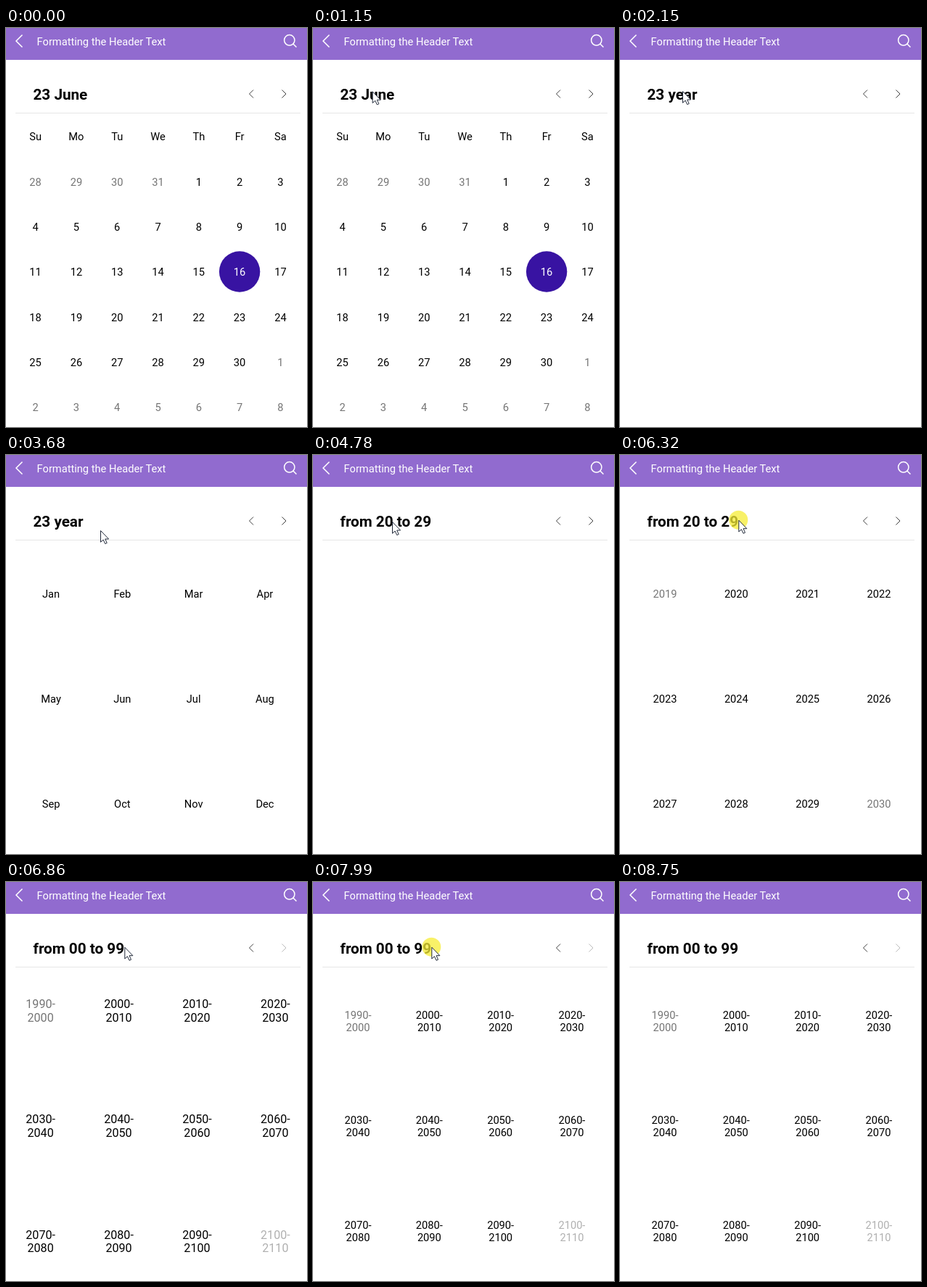
These frames come from a looping animation (415x551 px, 9020 ms). An HTML page:

```html
<!DOCTYPE html>
<html lang="en">
<head>
<meta charset="utf-8">
<title>Calendar header</title>
<style>
  html, body { margin: 0; width: 100%; height: 100%; overflow: hidden; background: #fff; }
  svg { display: block; width: 415px; height: 551px; font: 14.65px Roboto, sans-serif; fill: #000; }
  .line { fill: none; stroke: #3c3c3c; stroke-width: 1; }
  .bar { fill: none; stroke: #fff; stroke-width: 1.5; }
  .cells { text-anchor: middle; }
  .dim { fill: #757575; }
  .off { fill: #b0b0b0; }
  .picked { fill: #fff; }
</style>
</head>
<body>
<svg viewBox="0 0 415 551">
  <defs><clipPath id="body"><rect x="13" y="119" width="393" height="432"/></clipPath></defs>
  <rect width="415" height="44" fill="#916bcf"/>
  <g class="bar"><path d="M22.5 9.5L14 18l8.5 8.5"/><circle cx="390.8" cy="16.8" r="7.2"/><path d="M396 22l4.5 4.5"/></g>
  <text x="42.6" y="23.8" fill="#fff">Formatting the Header Text</text>
  <text id="header" x="37.5" y="99.3" font-size="20.7" font-weight="700"></text>
  <path class="line" d="M341 85.5L335.5 91l5.5 5.5"/>
  <path id="next" class="line" d="M380.5 85.5L386 91l-5.5 5.5"/>
  <path d="M13 117.5H406" stroke="#e6e6e6"/>
  <g id="views" class="cells" clip-path="url(#body)"></g>
  <circle id="tap" r="13" fill="#f6ec35" opacity=".75"/>
  <path id="cursor" d="M.5 .5V16.3L4.1 13 6.7 18.6 9.2 17.5 6.7 12H11.6Z" fill="#fff" stroke="#222a3a"/>
</svg>
<script>
const LOOP = 9020, STEP = 67.5, CX = 209.5, CY = 337;
const TAP_HOLD = 140, FADE = 70, GROW = 3 * STEP;
const $ = id => document.getElementById(id);
const label = (x, y, s, cls = '') => `<text x="${x}" y="${y + 5.2}" class="${cls}">${s}</text>`;
const stepped = t => Math.floor(Math.max(0, t) / STEP + 1e-6) * STEP;
const easeOut = (p, power) => 1 - (1 - Math.min(1, p)) ** power;

// Lays out cells in a grid centred on the calendar body.
function grid(cols, rows, dx, dy, cell) {
  return Array.from({ length: cols * rows }, (_, i) =>
    cell(i, CX + dx * (i % cols - (cols - 1) / 2), CY + dy * (Math.floor(i / cols) - (rows - 1) / 2))).join('');
}

const weekdays = 'Su Mo Tu We Th Fr Sa'.split(' ');
const months = 'Jan Feb Mar Apr May Jun Jul Aug Sep Oct Nov Dec'.split(' ');

function monthCell(i, x, y) {
  const day = i - 10;
  if (i < 7) return label(x, y, weekdays[i]);
  if (day < 1) return label(x, y, day + 31, 'dim');
  if (day > 30) return label(x, y, day - 30, 'dim');
  if (day === 16) return `<circle cx="${x}" cy="${y - .5}" r="28.2" fill="#3813a2"/>` + label(x, y, day, 'picked');
  return label(x, y, day);
}

function decadeCell(i, x, y) {
  const from = 1990 + 10 * i, cls = i === 0 ? 'dim' : i === 11 ? 'off' : '';
  return label(x, y - 8.5, from + '-', cls) + label(x, y + 8.5, from + 10, cls);
}

const twelve = cell => grid(4, 3, 98.3, 145.2, cell);

// enter: the view starts to appear; tap: the header is clicked while it is open
const views = [
  { title: '23 June', enter: -LOOP, tap: 1940, html: grid(7, 7, 56.3, 62.3, monthCell) },
  { title: '23 year', enter: 2340, tap: 4570, html: twelve((i, x, y) => label(x, y, months[i])) },
  { title: 'from 20 to 29', enter: 4850, tap: 6320, html: twelve((i, x, y) => label(x, y, 2019 + i, i % 11 ? '' : 'dim')) },
  { title: 'from 00 to 99', enter: 6790, tap: 7990, html: twelve(decadeCell) }
];
const last = views.length - 1;
$('views').innerHTML = views.map(v => `<g>${v.html}</g>`).join('');
const groups = [...$('views').children];

// Cursor moves; each one continues from where the previous one ended.
const moves = [
  { start: 260, end: 1000, x: 71, y: 88 },
  { start: 1000, end: 1220, x: 86, y: 87 },
  { start: 3330, end: 3660, x: 130, y: 104 },
  { start: 3680, end: 3820, x: 144, y: 104 },
  { start: 4020, end: 4420, x: 109, y: 92 },
  { start: 4980, end: 5390, x: 173, y: 90 },
  { start: 5520, end: 5660, x: 163.3, y: 89.7 },
  { start: 8190, end: 8700, x: 400, y: 540 }
];

function cursorAt(t) {
  let x = 329, y = 525;
  for (const m of moves) {
    const p = easeOut(stepped(t - m.start) / (m.end - m.start), 1.3);
    x += (m.x - x) * p;
    y += (m.y - y) * p;
  }
  return [x, y];
}

function drawView(view, i, t) {
  const leave = i < last ? view.tap + TAP_HOLD : LOOP;
  const p = stepped(t - view.enter) / GROW;
  const shown = t >= view.enter && t < leave + FADE;
  const opacity = t >= leave ? .4 : Math.min(1, .5 + 2 * p);
  const scale = 1.22 - .22 * easeOut(p, 2);
  groups[i].setAttribute('opacity', shown ? opacity : 0);
  groups[i].setAttribute('transform', `translate(${CX} ${CY}) scale(${scale}) translate(${-CX} ${-CY})`);
}

function draw(t) {
  const open = Math.min(last, views.filter(v => t >= v.tap + TAP_HOLD).length);
  $('header').textContent = views[open].title;
  $('next').style.stroke = open === last ? '#bbb' : '';
  views.forEach((v, i) => drawView(v, i, t));
  const [x, y] = cursorAt(t);
  for (const id of ['cursor', 'tap']) $(id).setAttribute('transform', `translate(${x} ${y})`);
  $('cursor').style.display = t >= 260 && t < 8750 ? '' : 'none';
  $('tap').style.display = views.some(v => t >= v.tap && t < v.tap + TAP_HOLD) ? '' : 'none';
}

const began = performance.now();
function tick() {
  draw((performance.now() - began) % LOOP);
  requestAnimationFrame(tick);
}
tick();
</script>
</body>
</html>
```
